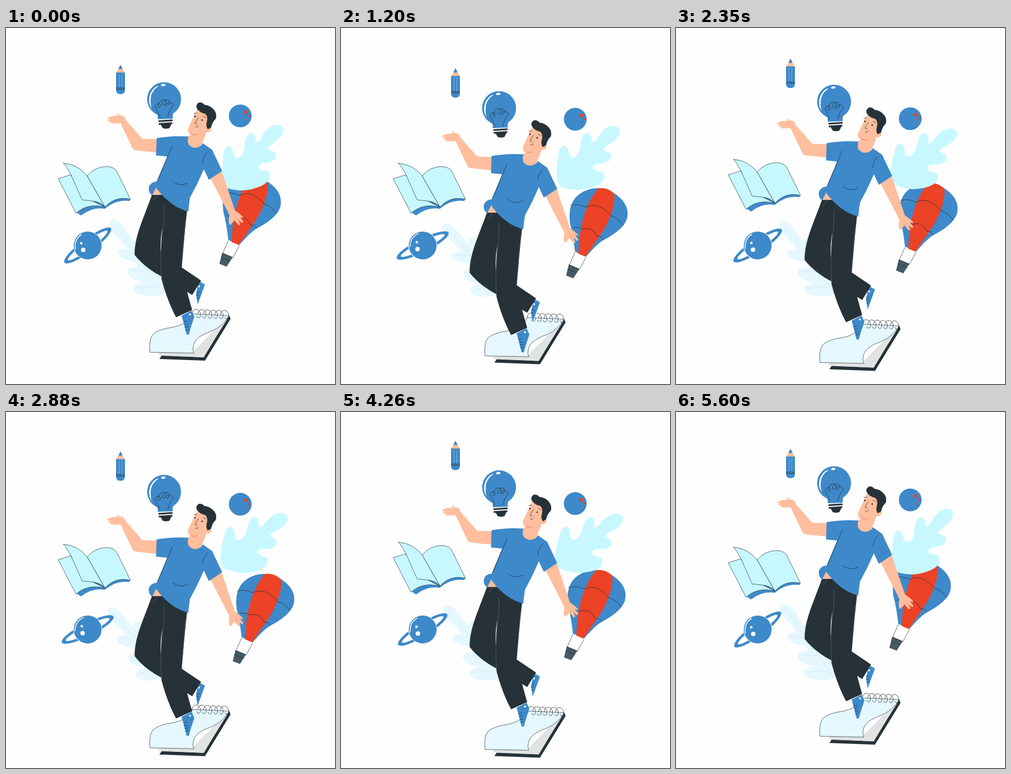
An HTML page for the animation above (5.68 s loop, 592 by 640 pixels).

```html
<!DOCTYPE html>
<html lang="en">
<head>
<meta charset="utf-8">
<title>Floating ideas</title>
<style>
  html, body { margin: 0; width: 100%; height: 100%; overflow: hidden; background: #fefefe; }
  svg { display: block; width: 592px; height: 640px; }
  .blue { fill: #3e89c9; }
  .dark { fill: #263238; }
  .skin { fill: #ffbe9d; }
  .cyan { fill: #c7f8ff; }
  .pale { fill: #e5f7ff; }
  .red { fill: #ec4226; }
  .white { fill: #fff; }
  .line { fill: none; stroke: #263238; stroke-width: .8; stroke-linecap: round; stroke-linejoin: round; }
  .edge { stroke: #263238; stroke-width: .7; stroke-linejoin: round; }
  .vein { fill: none; stroke: #d5eaf0; stroke-width: .8; }
</style>
</head>
<body>
<svg viewBox="0 0 592 640">
  <g id="backLeaf">
    <path class="pale" d="M187 352Q188 344 195 344Q206 347 217 364Q225 378 231 384L236 374Q262 380 270 400L290 470Q290 480 275 481Q255 483 240 479Q229 475 229 467Q232 460 246 458Q244 456 230 452Q219 446 218 436Q222 429 236 430Q238 422 228 419Q204 416 200 403Q203 396 218 397Q210 385 200 375Q187 362 187 352Z"/>
    <path class="vein" d="M195 352Q235 405 284 478M205 402L232 405M222 436L254 438M235 467L274 465"/>
  </g>

  <g id="balloon">
    <path class="blue" d="M400 381Q397 352 391 330Q386 290 412 275Q440 258 472 277Q500 296 493.500 322Q487 342 450 361Q438 369 420 390Z"/>
    <path class="red" d="M442 267Q458 265 470 276C475 290 464 325 447 349L419 390L406 385C408 338 417 296 442 267Z"/>
    <path class="line" d="M392 298Q406 294 420 301Q443 290 465 317Q475 318 487 333M398 338Q408 336 414 341Q431 335 440 354Q447 352 451 360"/>
    <path class="white edge" d="M400 382L390 405L408 413L420 391"/>
    <path fill="#455a64" d="M389 404L408 412L397 429L384 424Z"/>
    <path class="line" d="M389 405L407 412M387 412L403 419"/>
  </g>

  <g id="frontLeaf">
    <path class="cyan" d="M398 288Q389 278 389 262Q389 240 392 222Q396 212 402 213Q407 216 409 225Q412 237 420 233Q429 228 430 205Q433 188 442 189Q450 192 449 205Q452 208 458 200Q468 178 485 174Q499 174 499 184Q497 196 484 205Q472 214 471 217Q474 221 483 222Q488 228 484 235Q478 242 462 243Q452 246 454 252Q460 257 472 257Q477 264 473 273Q466 283 448 288Q425 296 398 288Z"/>
    <path class="vein" d="M408 283Q438 233 488 184M412 277L399 224M433 246L440 198M446 230L480 229M416 272L468 267"/>
  </g>

  <g id="pencil">
    <path class="skin" d="M206 66L214 81H198Z"/>
    <path class="blue" d="M206 66L209.5 73Q206 75 202.5 73ZM198 80H214V111Q214 119 206 119T198 111Z"/>
    <path d="M203.500 82V107M208.500 82V107" stroke="#8db9df" stroke-width=".8"/>
    <path class="line" d="M198.500 108H213.500M198.500 110.500H213.500"/>
  </g>

  <g id="bulb">
    <circle class="blue" cx="284.500" cy="128" r="30.500"/>
    <path class="blue" d="M268 148Q274 153 273 164L300 163Q299 153 304 148Z"/>
    <path class="line" d="M277 160L269 143C266 136 277 134 278 139S272 145 274 139C276 128 287 126 288 133S279 141 282 135C285 127 296 128 294 135S286 140 289 136C293 131 303 136 301 140Q295 144 291 160"/>
    <path class="white" d="M262 145Q254 132 260 117Q267 104 275 104Q264 111 261 122Q259 134 262 145Z"/>
    <ellipse class="white" cx="283" cy="102.500" rx="4" ry="2" transform="rotate(-8 283 102.500)"/>
    <path d="M275.500 167.500L298.500 166M276 172.500L298 171" stroke="#263238" stroke-width="3" stroke-linecap="round"/>
    <path class="dark" d="M278 173L298 172L294 180Q288 182 282 180Z"/>
  </g>

  <g id="book">
    <path class="blue" d="M126 331L135 337Q155 321 178 325Q198 308 222 311L224 307L180 280L140 300Z"/>
    <path class="cyan edge" d="M94 271L116 264L150 308L178 322Q147 314 126 333Z"/>
    <path class="cyan edge" d="M146 266Q160 249 182 249Q196 250 200 259L224 308Q197 301 178 322Z"/>
    <path class="cyan edge" d="M103 243Q130 245 146 266L178 322Q170 312 155 311L137 309Q125 282 117 264Q108 247 103 243Z"/>
  </g>

  <g id="ringed">
    <g transform="rotate(-36.500 147 391)">
      <path class="blue" fill-rule="evenodd" d="M95 391a52 12 0 0 1 104 0a52 12 0 0 1-104 0ZM103 391a44 7 0 0 0 88 0a44 7 0 0 0-88 0Z"/>
    </g>
    <circle cx="147" cy="391" r="25.500" fill="#3e89c9" stroke="#fefefe"/>
    <path d="M125 398Q122 380 136 371" fill="none" stroke="#fff" stroke-width="1.500"/>
    <circle class="white" cx="135.500" cy="387" r="2.300"/>
    <circle class="white" cx="139" cy="399" r="4"/>
  </g>

  <g id="ball">
    <circle class="blue" cx="421.500" cy="158" r="20.500"/>
    <circle class="red" cx="432" cy="151" r="3.300"/>
    <circle class="red" cx="437.500" cy="158" r="2"/>
    <circle class="red" cx="433" cy="165" r="1"/>
  </g>

  <g id="notebook">
    <path class="dark" d="M402 517L404 523L358 598L276 595L280 589L355 592Z"/>
    <path fill="#e1e3e3" d="M400 518L356 592L273 588L277 582H336Z"/>
    <path class="pale edge" d="M259 583Q257 560 264 551Q275 541 300 538Q327 533 335 514L401 517Q392 535 370 545Q339 555 337 572Q335 579 338 584.500Z"/>
    <g id="spiral"></g>
  </g>

  <g id="man">
    <path class="blue" d="M345 463L349 456L358 461L345 497L342 479Z"/>
    <path d="M359 462L346 496" stroke="#fff"/>
    <path class="line" d="M343 475L347 476M343 480L346 481M343 485L346 486"/>
    <circle class="white" cx="347.500" cy="464.500" r="1.700"/>
    <path class="blue" d="M316 517L334 508L339 519Q333 535 329 551H325Q321 535 316 517Z"/>
    <path class="line" d="M320 528L325 527M321 533L326 532M322 538L328 537M323 543L328 542"/>
    <circle class="white" cx="331" cy="515" r="1.800"/>

    <path class="dark" d="M264 296C249 339 231 373 231.500 408C245 425 262 438 285 449L335 480L351 454L317 431L279 405Q276 380 284 345V300Z"/>
    <path class="dark" d="M283 297L326 326Q320 380 316 432Q322 462 335 507L306 520Q290 490 280 452Q277 415 281 360Z"/>
    <path d="M284 318Q285 350 281 372Q277 410 280 450M323 345L316 430M264 310Q270 308 271 300" fill="none" stroke="#5d6b71" stroke-width=".7"/>

    <path class="skin" d="M368 270L388 257L412 328Q420 333 426 339L427 342L421 340L427 348L425 351L418 345L422 353L419 355L411 346L404 354Q400 353 401 342Q403 338 400 332Z"/>
    <path d="M413 340L419 345M410 342L415 348" stroke="#e88f70" stroke-width=".7"/>
    <path class="skin" d="M272 200L245 199L215 165Q214 157 205 157L199 152.500L201 158Q192 157 186 160L180 163L187 164L182 167L189 168L188 171Q194 172 206 171L228 217Q229 219 234 220L272 224Z"/>
    <path class="skin" d="M270 287L262 300L285 300Z"/>
    <path class="blue" d="M271 198Q300 193 328 195Q329 216 342 215Q352 213 354 207L371 219L389 257L365 273L356 254Q345 280 331 305Q329 318 328 330Q311 325 300 317Q284 306 270 287L263 301Q256 296 257 287Q259 277 271 276L290 231L270 229Z"/>
    <path class="line" d="M299 212L273 274M364 222Q355 229 354 242M300 276Q312 286 327 279"/>

    <path class="skin" d="M345 144L328 180Q325 189 334 192L329 193Q325 205 329 210Q337 218 346 214Q352 212 353 207L361 187Q369 188 370 181Q368 176 362 180L364 160Q357 148 345 144Z"/>
    <path d="M332 190Q338 194 344 191" fill="none" stroke="#f29173" stroke-width="1.500"/>
    <path class="dark" d="M343 144Q341 138 347 134Q353 133 357 138Q368 139 375 148Q380 155 377.500 163Q371 169 369 179L363 182Q359 176 361.500 168Q364 159 358 154Q349 153 343 144Z"/>
    <path class="line" d="M346 161L340 171Q341 173 344 172M341 178Q345 179 346 176M338 153.500L343 153M355 159Q358 159 360 162"/>
    <circle class="dark" cx="340" cy="159" r="1.400"/>
    <circle class="dark" cx="353" cy="165.500" r="1.400"/>
  </g>
</svg>
<script>
const LOOP = 5680, STEPS = 64, CYCLE = STEPS / 3;
const part = id => document.getElementById(id);
const move = (id, x, y) => part(id).setAttribute('transform', `translate(${x} ${y})`);
const turn = (id, angle, x, y) => part(id).setAttribute('transform', `rotate(${angle} ${x} ${y})`);

// Smooth periodic curve through [step, value] keys
function curve(period, keys) {
  const n = keys.length;
  const key = i => {
    const lap = Math.floor(i / n), [t, v] = keys[i - lap * n];
    return [t + lap * period, v];
  };
  return step => {
    const p = step % period;
    let i = 0;
    while (key(i + 1)[0] <= p) i++;
    const [[ta, a], [tb, b], [tc, c], [td, d]] = [-1, 0, 1, 2].map(k => key(i + k));
    const h = tc - tb, u = (p - tb) / h, w = 1 - u;
    const mb = (c - a) / (tc - ta) * h, mc = (d - b) / (td - tb) * h;
    return w * w * ((1 + 2 * u) * b + u * mb) + u * u * ((1 + 2 * w) * c - w * mc);
  };
}

const sway = curve(CYCLE, [[0, 0], [5.67, 9], [7.33, 14.6], [12.33, 33], [14, 32], [18.67, 13]]);
const pad = curve(CYCLE, [[0, 0], [5.67, 18.5], [7.33, 23.6], [9.3, 29.5], [12.33, 17.5], [14, 6.5], [18.67, -15]]);
const pages = curve(CYCLE, [[0, 0], [5.67, -7], [7.33, -9], [9.3, -9.5], [12.33, -4], [14, 0], [18.67, 5]]);
const drift = curve(CYCLE, [[0, 0], [5.67, 12], [7.33, 17.3], [9.3, 25], [12.33, 23.3], [14, 21], [18.67, 6.5]]);
const bob = curve(CYCLE, [[0, 0], [5.67, 5], [7.33, 6.6], [12.33, 7.8], [14, 6], [18.67, 3]]);
const hop = curve(CYCLE / 2, [[0, 0], [1.67, 7], [3.33, 6.3], [5.67, -11], [7.6, -14]]);

part('spiral').innerHTML = Array.from({ length: 6 }, (_, i) =>
  `<path class="line" d="M${335 + i * 10.2} ${514 + i * .4}c1-12 14-10 15 1c0 7-5 8-7 3"/>`).join('');

function draw(t) {
  // The last steps are held a little longer
  const step = Math.max(0, Math.min(STEPS, Math.floor(Math.min(t / 85.7 + .3, 59 + (t - 5100) / 100))));
  const s = sway(step), n = pad(step), d = drift(step);
  move('man', 0, s);
  move('bulb', 0, s / 2);
  turn('ringed', s * .315, 147, 391);
  turn('backLeaf', s * -.147, 275, 418);
  move('notebook', 0, n);
  turn('frontLeaf', n * .42, 443, 240);
  move('book', 0, pages(step));
  move('balloon', d, d);
  move('ball', 0, bob(step));
  move('pencil', 0, hop(step));
}

const start = performance.now();
function tick() {
  draw((performance.now() - start) % LOOP);
  requestAnimationFrame(tick);
}
tick();
</script>
</body>
</html>
```
